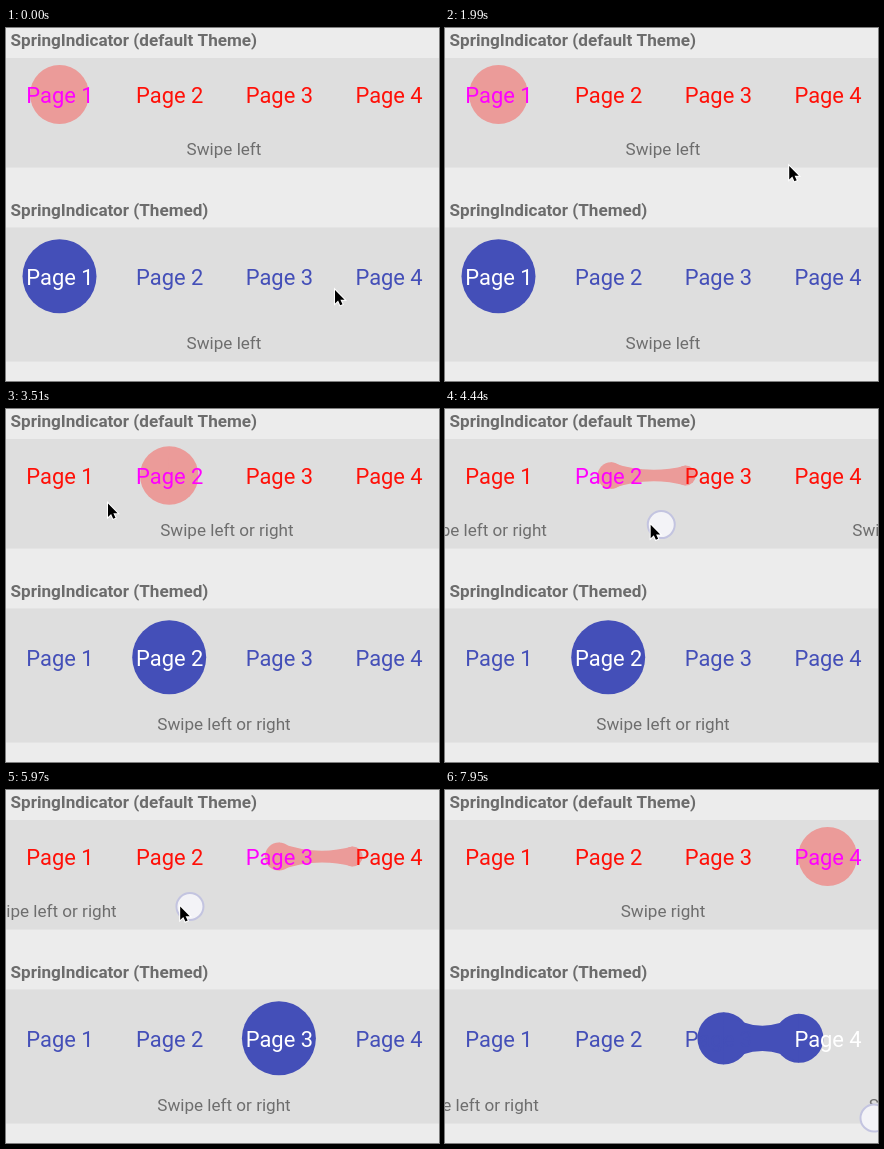
An HTML page with a canvas for the animation above (8 s loop, 433 px wide and 353 px high).

```html
<!DOCTYPE html>
<html lang="en">
<head>
<meta charset="utf-8">
<title>Spring indicator</title>
<style>
html, body { margin: 0; width: 433px; height: 353px; overflow: hidden; background: #ececec; }
canvas { display: block; }
</style>
</head>
<body>
<canvas id="stage" width="433" height="353"></canvas>
<script>
const ctx = document.getElementById('stage').getContext('2d');
const LOOP = 8000, STEP = 117;   // the screen is refreshed every STEP ms
const PAGE_W = 438.8, MID = 218, TAB_X = 53.5, TAB_GAP = PAGE_W / 4;
const LAG = 25;                  // the touch dot trails the arrow
const RELEASE = 0.75;            // share of a swipe after which the finger lifts
const SETTLE = 500;

const PANELS = [
  { title: 'SpringIndicator (default Theme)', top: 30, height: 109.5,
    rMin: 10, rMax: 29.5, ball: '#eb9b99', text: '#ff1008', active: '#ff00ff' },
  { title: 'SpringIndicator (Themed)', top: 199.5, height: 134,
    rMin: 24.5, rMax: 37, ball: '#444fb8', text: '#444fb8', active: '#ffffff' }
];

// The arrow rests between moves
const HOME = { x: 329, y: 262 };
const move = (start, end, x, y) => ({ start, end, x, y });
const swipe = (start, end, x, y) =>
  ({ ...move(start, end, x, y), swipe: true, release: start + RELEASE * (end - start) });
const MOVES = [
  move(0, 234, 297, 282),
  move(470, 936, 372, 347.5),
  move(936, 1287, 358, 300),
  move(1520, 2223, 342, 112),
  swipe(2350, 3510, 102, 94.5),
  move(3510, 3990, 399, 115),
  swipe(4090, 4880, 106, 116),
  move(4880, 5382, 358, 118),
  swipe(5650, 6180, 130, 116),
  move(6180, 6903, 212, 305),
  move(6903, 7254, 181, 319),
  swipe(7340, 8300, 483, 330)
];
const SWIPES = MOVES.filter(m => m.swipe);
const LAST = SWIPES[SWIPES.length - 1];

function pointer(t) {
  let { x, y } = HOME;
  for (const m of MOVES) {
    if (t < m.start) break;
    const u = 1 - (1 - Math.min(1, (t - m.start) / (m.end - m.start))) ** 1.8;
    x += (m.x - x) * u;
    y += (m.y - y) * u;
  }
  return { x, y };
}

const touch = (start, t) => pointer(Math.max(start, t - LAG));
const dragged = (start, t) => (pointer(start).x - touch(start, t).x) / PAGE_W;

// Page position and selected page of the upper pager
function upperState(t) {
  let pos = 0, page = 0;
  for (const { start, release } of SWIPES) {
    if (t < start || start === LAST.start) break;
    pos = page + dragged(start, Math.min(t, release));
    if (t < release) break;
    page++;
    const u = Math.min(1, (t - release) / SETTLE);
    pos = page - (page - pos) * (1 - u) ** 5;
  }
  return { pos, page };
}

// The lower pager jumps along with the upper one until it is swiped itself
function lowerState(t, page) {
  return { pos: t < LAST.start ? page : page + dragged(LAST.start, t), page };
}

function text(str, x, y, color, font, align = 'center') {
  ctx.fillStyle = color;
  ctx.font = font + ' Roboto, sans-serif';
  ctx.textAlign = align;
  ctx.fillText(str, x, y);
}

function disc(x, y, r) {
  ctx.beginPath();
  ctx.arc(x, y, r, 0, 2 * Math.PI);
  ctx.fill();
}

function ease(u) {
  const a = 0.5;
  u = Math.min(1, Math.max(0, u));
  return (Math.atan(2 * a * u - a) + Math.atan(a)) / (2 * Math.atan(a));
}

// Two discs joined by a neck; the head leads, the foot follows
function spring({ rMin, rMax, ball }, y, pos) {
  const i = Math.floor(pos), p = pos - i;
  const tabX = f => TAB_X + TAB_GAP * (i + f);
  const radius = f => rMin + (rMax - rMin) * Math.max(0, f);
  const hx = tabX(ease(p / 0.6)), hr = radius(2 * p - 1);
  const fx = tabX(ease((p - 0.4) / 0.6)), fr = radius(1 - 2 * p);
  const mx = (hx + fx) / 2;
  ctx.fillStyle = ball;
  disc(fx, y, fr);
  if (p < 1e-4) return;
  disc(hx, y, hr);
  ctx.beginPath();
  ctx.moveTo(fx, y + fr);
  ctx.quadraticCurveTo(mx, y, hx, y + hr);
  ctx.lineTo(hx, y - hr);
  ctx.quadraticCurveTo(mx, y, fx, y - fr);
  ctx.fill();
}

function caption(page) {
  if (page === 0) return 'Swipe left';
  return page === 3 ? 'Swipe right' : 'Swipe left or right';
}

function drawPanel(panel, { pos, page }) {
  const { top, height } = panel;
  const ballY = top + (height - 36.4) / 2;
  text(panel.title, 4.5, Math.floor(top - 11.5), '#6c6c6c', 'bold 17.1px', 'left');
  ctx.fillStyle = '#dedede';
  ctx.fillRect(0, top, 433, height);
  spring(panel, ballY, pos);
  for (let i = 0; i < 4; i++) {
    text(caption(i), MID + (i - pos) * PAGE_W, top + height - 12.5, '#6e6e6e', '17.1px');
    text('Page ' + (i + 1), TAB_X + 0.45 + i * TAB_GAP, Math.round(ballY + 8.5),
      i === page ? panel.active : panel.text, '21.9px');
  }
}

function drawTouch({ x, y }) {
  ctx.fillStyle = '#f3f3f7';
  disc(x, y, 13.5);
  ctx.strokeStyle = '#c3c4e0';
  ctx.lineWidth = 2;
  ctx.stroke();
}

const ARROW = new Path2D('M0 0V13.5L3.1 10.6 5.2 15.2 7.5 14.2 5.4 9.8H9.6Z');

function drawArrow({ x, y }) {
  ctx.save();
  ctx.translate(x, y);
  ctx.strokeStyle = '#fff';
  ctx.lineWidth = 2;
  ctx.stroke(ARROW);
  ctx.fillStyle = '#000';
  ctx.fill(ARROW);
  ctx.restore();
}

function draw(now) {
  const t = Math.floor((now % LOOP + 7) / STEP) * STEP;
  ctx.fillStyle = '#ececec';
  ctx.fillRect(0, 0, 433, 353);
  const upper = upperState(t);
  drawPanel(PANELS[0], upper);
  drawPanel(PANELS[1], lowerState(t, upper.page));
  const held = SWIPES.find(s => t >= s.start && t < s.release);
  if (held) drawTouch(touch(held.start, t));
  drawArrow(pointer(t));
}

const begin = performance.now();
(function frame() {
  draw(performance.now() - begin);
  requestAnimationFrame(frame);
})();
</script>
</body>
</html>
```
